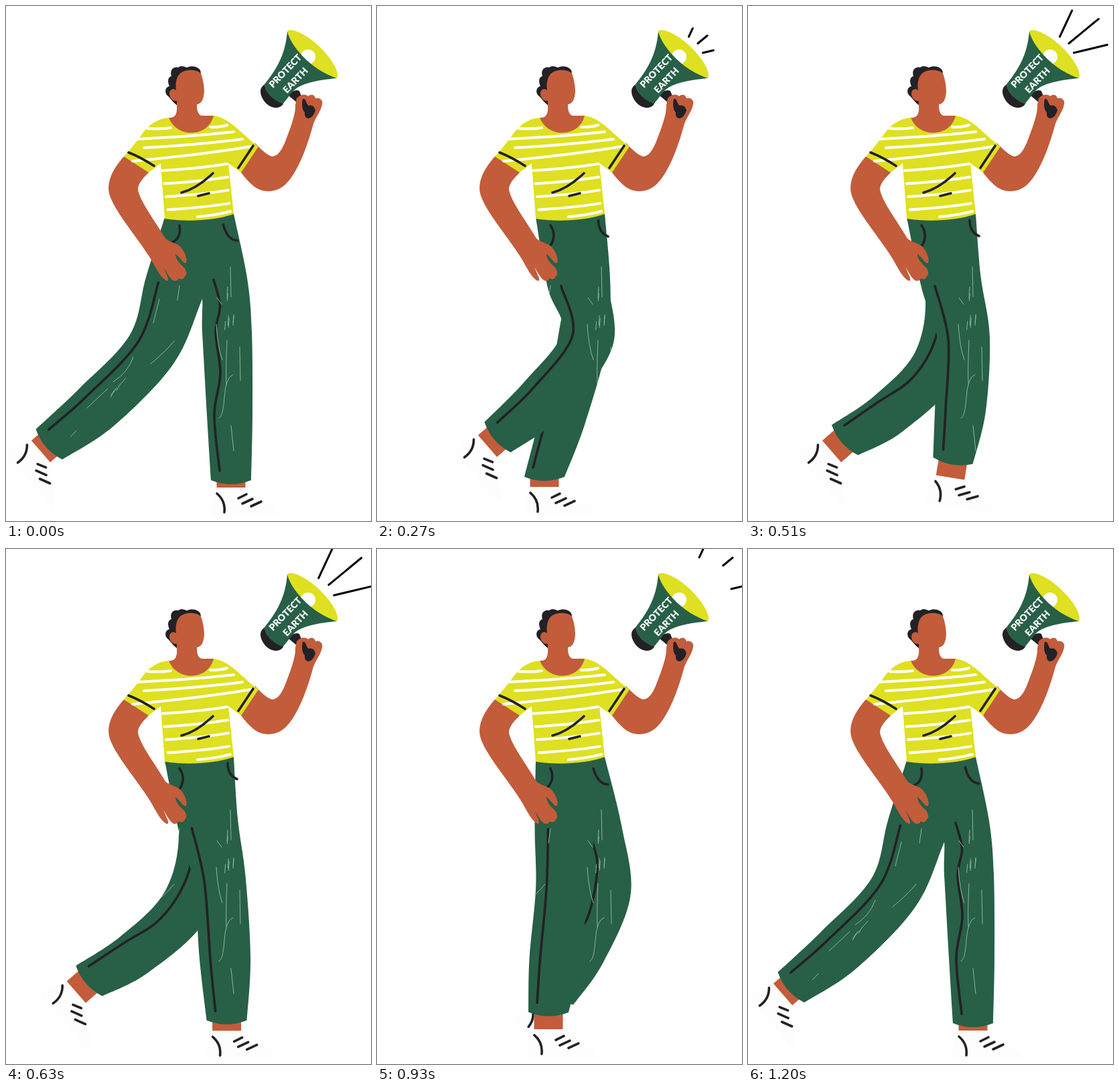
An HTML page for the animation above (1230 ms loop, 545 by 770 pixels).

```html
<!DOCTYPE html>
<html lang="en">
<head>
<meta charset="utf-8">
<title>Walking with a megaphone</title>
<style>
  html, body { margin: 0; width: 100%; height: 100%; overflow: hidden; background: #fff; }
  svg { display: block; width: 545px; height: 770px; }
  .skin { fill: #c25c3b; }
  .green { fill: #285f47; }
  .yellow { fill: #dfe021; }
  .dark { fill: #232126; }
  .shoe { fill: #fdfdfd; }
  .ink, .stripe, .grain, .ray { fill: none; stroke-linecap: round; stroke-linejoin: round; }
  .ink { stroke: #232126; stroke-width: 3.6; }
  .stripe { stroke: #fff; stroke-width: 4; }
  .grain { stroke: #86b59f; stroke-width: 1; }
  .ray { stroke: #000; stroke-width: 3; }
  text { font: 900 14px Lato, "Open Sans", sans-serif; fill: #fff; text-anchor: middle; }
</style>
</head>
<body>
<svg viewBox="0 0 545 770">
  <defs>
    <g id="foot">
      <path class="shoe" d="M-22 0Q-31 18-31 43H77Q70 30 50 20Q30 12 21 0Z"/>
      <rect class="skin" x="-21.5" y="-32" width="43" height="32"/>
      <path class="ink" d="M-21 9Q-8 20-10 37M11 16L23 10M17 24L32 17M30 28L45 21"/>
    </g>
    <clipPath id="trousers"><path id="clipFar"/><path id="clipNear"/></clipPath>
  </defs>

  <use href="#foot" id="footFar"/>
  <path id="legFar" class="green"/>
  <path id="seamFar" class="ink"/>
  <use href="#foot" id="footNear"/>
  <path id="legNear" class="green"/>
  <path id="seamNear" class="ink"/>

  <g class="grain" clip-path="url(#trousers)">
    <path d="M335 390L336 435M331 420L330 437M315 436L322 446M314 476Q316 510 323 529M330 500Q328 540 329 565M349 510L350 560M339 551Q328 555 326 585T318 616M336 627L340 665M259 418L256 440M229 438L220 474M251 501Q240 515 216 535M190 525Q182 548 160 562M152 572L121 601"/>
    <path id="flecks"/>
  </g>
  <path id="pockets" class="ink"/>

  <!-- head and neck -->
  <path class="dark" d="M256 149C248 143 246 138 241 134C236 129 238 121 244 120C240 111 243 106 247 105C244 96 250 90 257 92C262 88 267 91 270 92C276 89 284 90 287 93C292 96 291 101 290 106Z"/>
  <path class="skin" d="M254 126C252 112 256 100 267 97C278 94 288 97 291 101C294 108 296 120 296 128C295 140 292 146 285 147C285 155 286 162 292 164H310C312 202 248 202 243 167C252 167 256 163 255 148L255 142C249 143 244 137 244 131C244 125 250 122 254 126Z"/>

  <!-- left arm -->
  <path class="skin" d="M176 225C160 243 150 262 154 280C160 305 197 347 216 378C224 392 232 408 240 411C244 411 242 406 240 402L235 390C240 398 246 411 252 411C256 411 257 409 258 407C262 410 266 408 267 404C271 402 269 395 266 391C261 386 254 381 253 371C261 376 264 386 269 384C272 376 264 362 258 358C250 353 241 352 237 346C225 325 199 291 197 274C197 265 206 256 213 249L222 238Z"/>

  <!-- right arm -->
  <path class="dark" d="M422 134C424 128 434 124 438 127L442 137L434 144Z"/>
  <path class="skin" d="M372 205C384 218 392 224 398 225C406 224 411 216 416 205C425 182 433 160 432 148L434 138C440 132 447 131 451 135C456 131 461 133 462 138C467 136 474 140 472 147C470 158 463 165 459 176C450 210 436 248 418 266C405 279 385 280 372 271C364 265 357 257 351 249L345 240Z"/>
  <path class="dark" d="M443 139C448 137 448 147 452 149C456 147 461 150 462 156C460 163 456 168 451 168C446 167 446 163 446 159C441 154 442 144 443 139Z"/>

  <!-- shirt -->
  <path class="yellow" d="M243 167C228 168 215 176 205 189C195 203 185 215 176 225L213 249L231 235L237 318C270 323 312 321 340 311L332 235L351 249L377 210C355 195 335 167 310 164C302 197 255 198 243 167Z"/>
  <path id="stripes" class="stripe"/>
  <path class="ink" d="M183 219Q201 226 221 239M369 209L347 242M262 279Q285 273 309 250M287 284L303 280"/>

  <!-- megaphone -->
  <path class="yellow" d="M420 38C424 32 445 40 465 58C485 76 499 99 494 108L430 95Z"/>
  <circle cx="451" cy="76" r="11" fill="#fff"/>
  <path class="green" d="M420 38C423 50 431 62 442 74C456 90 478 103 494 108C465 111 440 115 428 128L413 147C400 142 388 130 386 117C402 97 417 75 420 38Z"/>
  <path class="dark" d="M386 117C388 130 400 142 414 146C410 154 398 154 390 147C382 140 377 128 382 121Z"/>
  <text transform="translate(417 97) rotate(-46)" y="5">PROTECT</text>
  <text transform="translate(432 111) rotate(-46)" y="5">EARTH</text>

  <path id="rays" class="ray"/>
</svg>
<script>
const LOOP = 1230, CYCLE = 1200, STEP = 30;
const WAIST = [[237, 316], [340, 311]];
const TIMES = [0, 120, 270, 510, 600, 750, 930];

// gait: knee and foot at each time; half: half widths at thigh, knee, calf and hem
const LEGS = {
  Far: {
    hip: [318, 330], half: [36, 37, 34, 30], seam: [14, 17, 23, 17], wave: 8,
    gait: [[330,487, 336,720], [319,498, 305,720], [307,500, 250,719], [282,535, 125,666],
           [262,535, 95,664], [310,520, 174,659], [342,512, 254,688]]
  },
  Near: {
    hip: [285, 330], half: [45, 39, 38, 30], seam: [25, 23, 22, 17], wave: 0,
    gait: [[217,514, 52,666], [254,508, 92,661], [314,499, 165,658], [322,497, 302,705],
           [322,492, 332,719], [302,512, 300,720], [276,510, 256,718]]
  }
};

const $ = id => document.getElementById(id);
const set = (id, d) => $(id).setAttribute('d', d);
const clamp = x => Math.max(0, Math.min(1, x));
const mix = (a, b, k) => a + (b - a) * k;
const add = (p, q, k = 1) => p.map((x, i) => x + q[i] * k);
const mid = (p, q) => p.map((x, i) => (x + q[i]) / 2);
const unit = ([x, y]) => [x / Math.hypot(x, y), y / Math.hypot(x, y)];
const heading = (p, q) => unit(add(q, p, -1));
const back = ([x, y]) => [-y, x];
const xy = p => p.map(x => x.toFixed(2)).join(' ');

// Periodic Hermite spline through the gait
function sample(gait, t) {
  const n = gait.length;
  const key = i => ({ t: TIMES[(i + n) % n] + Math.floor(i / n) * CYCLE, v: gait[(i + n) % n] });
  let i = n - 1;
  while (TIMES[i] > t) i--;
  const [a, b, c, d] = [key(i - 1), key(i), key(i + 1), key(i + 2)];
  const h = c.t - b.t, u = (t - b.t) / h, w = 1 - u;
  return b.v.map((p, j) => {
    const q = c.v[j];
    const m = (q - a.v[j]) / (c.t - a.t) * h;
    const k = (d.v[j] - p) / (d.t - b.t) * h;
    return p * w * w * (1 + 2 * u) + q * u * u * (1 + 2 * w) + m * u * w * w - k * u * u * w;
  });
}

// Smooth curve segments through the points, without the initial move
function curve(pts) {
  const at = i => pts[Math.max(0, Math.min(pts.length - 1, i))];
  const ctl = (p, a, b) => add(p, add(b, a, -1), 1 / 6);
  return pts.slice(1).map((q, i) =>
    `C${xy(ctl(pts[i], at(i - 1), q))} ${xy(ctl(q, at(i + 2), pts[i]))} ${xy(q)}`).join('');
}

function drawLeg(name, t) {
  const { hip, half, seam, wave, gait } = LEGS[name];
  const v = sample(gait, t), knee = v.slice(0, 2), foot = v.slice(2);

  // the heel tips up as the foot lifts; the hem rides up as the leg shortens
  const lift = clamp((720 - foot[1]) / 54);
  const angle = 49 * lift * lift * (3 - 2 * lift);
  const rad = angle * Math.PI / 180, down = [-Math.sin(rad), Math.cos(rad)];
  const reach = Math.hypot(knee[0] - foot[0], knee[1] - foot[1]);
  const hem = add(foot, down, -Math.min(26, 20 - .6 * (reach - 218)));

  const thighDir = heading(hip, knee), shinDir = heading(knee, hem);
  const calf = add(mid(knee, hem), add(knee, hip, -1), 1 / 12);
  const joints = [mid(hip, knee), knee, calf, hem];
  const normals = [thighDir, unit(add(thighDir, shinDir)), shinDir, down].map(back);
  const side = (widths, k) => joints.map((p, i) => add(p, normals[i], widths[i] * k));

  const rear = side(half, 1), front = side(half, -1).reverse();
  const d = `M${xy(WAIST[0])}${curve([WAIST[0], ...rear])}Q${xy(add(hem, down, 12))} ${xy(front[0])}` +
    `${curve([...front, WAIST[1]])}Z`;
  set('leg' + name, d);
  set('clip' + name, d);

  const line = side(seam, 1);
  line[3] = add(line[3], down, -14);
  const stitched = line.flatMap((p, i) =>
    wave && i < 2 ? [p, add(mid(p, line[i + 1]), normals[i], -wave)] : [p]);
  set('seam' + name, `M${xy(stitched[0])}${curve(stitched)}`);
  $('foot' + name).setAttribute('transform', `translate(${foot}) rotate(${angle})`);
  return knee[0];
}

// Pockets slide with the knee below them
function drawPockets(nearX, farX) {
  const l = clamp((nearX - 220) / 100), r = clamp((335 - farX) / 30);
  set('pockets',
    `M259 328Q${mix(262, 270, l)} ${mix(348, 344, l)} ${mix(247, 258, l)} ${mix(354, 361, l)}` +
    `M${mix(323, 331, r)} ${mix(328, 320, r)}q${mix(7, 0, r)} ${mix(24, 18, r)} ${mix(22, 14, r)} 24`);
}

const ease = (t, from) => (1 - Math.cos(Math.PI * clamp((t - from) / 600))) / 2;

function drawRays(t) {
  const head = ease(t, 60), tail = ease(t, 540);
  const rays = [[465.5, 46, 487, 0], [479, 56, 531, 13], [486.5, 70, 545, 56]];
  set('rays', head <= tail ? '' : rays.map(([x, y, X, Y]) =>
    `M${mix(x, X, tail)} ${mix(y, Y, tail)}L${mix(x, X, head)} ${mix(y, Y, head)}`).join(''));
}

function drawStripes() {
  const stripe = (x, y, X, Y) => `M${x} ${y}Q${mix(x, X, .55)} ${(y + Y) / 2 + 2} ${X} ${Y}`;
  let d = stripe(211, 183, 246, 182) + stripe(305, 181, 330, 178) + stripe(195, 199, 340, 188) +
    stripe(206, 212, 353, 199) + stripe(189, 232, 366, 210) + stripe(286, 315, 335, 307);
  for (let i = 0; i < 4; i++) d += stripe(234 + 2.5 * i, 246 + 19.5 * i, 330 + i, 236 + 19.7 * i);
  set('stripes', d);
}

// Short scratches along the trailing calf and the front thigh
function drawFlecks() {
  let seed = 7, d = '';
  const rnd = () => (seed = seed * 16807 % 2147483647) / 2147483647;
  for (let i = 0; i < 6; i++) {
    const s = rnd();
    d += `M${105 + 80 * s} ${635 - 85 * s}l-${4 + 5 * rnd()} 9`;
    d += `M${325 + 22 * rnd()} ${430 + 45 * s}l-1 ${9 + 7 * rnd()}`;
  }
  set('flecks', d);
}

drawStripes();
drawFlecks();
const start = performance.now();

function frame() {
  const now = (performance.now() - start) % LOOP;
  const t = Math.floor(now / STEP) * STEP % CYCLE;
  const farX = drawLeg('Far', t), nearX = drawLeg('Near', t);
  drawPockets(nearX, farX);
  drawRays(t);
  requestAnimationFrame(frame);
}
frame();
</script>
</body>
</html>
```
